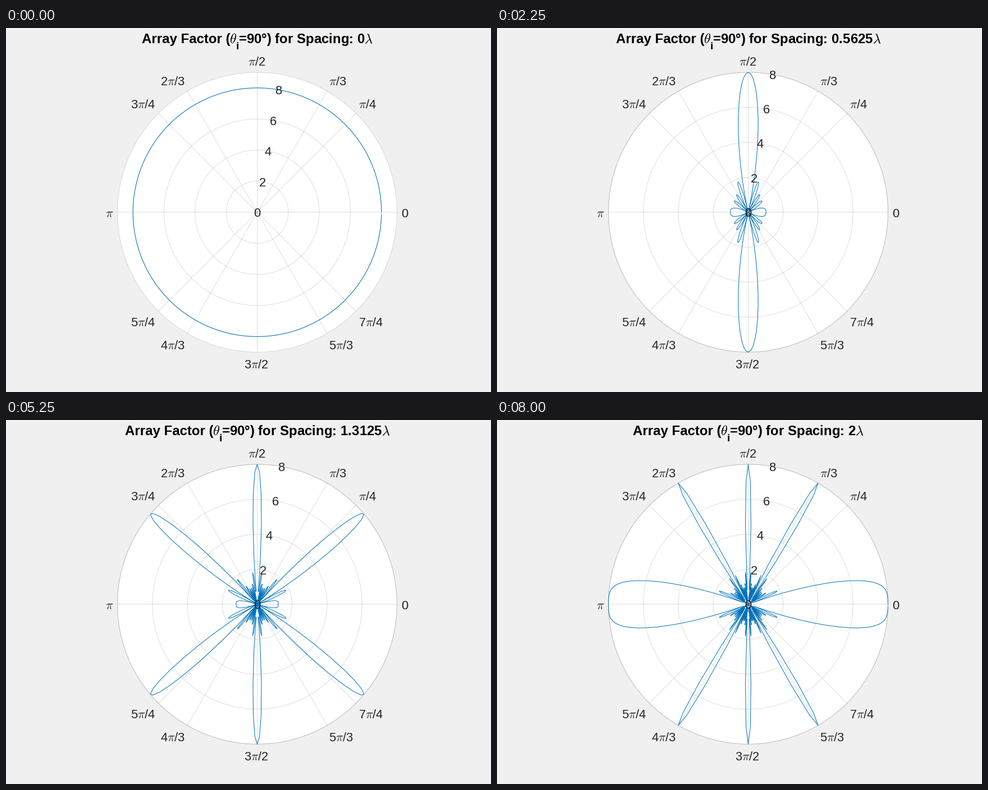
These frames come from a looping animation (864 by 648 pixels, 8.25 s). A matplotlib script:

```python
import numpy as np
import matplotlib.pyplot as plt
from matplotlib.animation import FuncAnimation
from matplotlib.patches import Circle

plt.rcParams.update({
    "font.family": "Liberation Sans",
    "mathtext.fontset": "cm",
    "path.snap": False,
})

W, H, DPI = 864, 648, 72
CX, CY, R = 447.5, 328, 249
ELEMENTS = 8
STEPS = 33
INK, BLUE = "#262626", "#0072BD"
TICK, TITLE = 22, 24

fig = plt.figure(figsize=(W / DPI, H / DPI), dpi=DPI, facecolor="#f0f0f0")
ax = fig.add_axes([0, 0, 1, 1])
ax.set_xlim(0, W)
ax.set_ylim(H, 0)
ax.axis("off")


def polar(angle, radius):
    return CX + radius * np.cos(angle), CY - radius * np.sin(angle)


def ring(radius):
    return ax.add_patch(Circle((CX, CY), radius, fill=False, ec=INK,
                               alpha=0.15, lw=1, zorder=2))


def label(x, y, text, size=TICK, **style):
    return ax.text(x, y, text, fontsize=size, va="baseline",
                   zorder=5, **{"color": INK, "ha": "center", **style})


# Plot area, spokes and rings
ax.add_patch(Circle((CX, CY), R, fc="white", ec="none", zorder=1))
ring(R)
rings = [ring(R * k / 8) for k in (2, 4, 6, 8)]
for deg in (0, 45, 60, 90, 120, 135, 180, 225, 240, 270, 300, 315):
    x, y = polar(np.radians(deg), R)
    ax.plot([CX, x], [CY, y], color=INK, alpha=0.15, lw=1, zorder=2)

# Angle labels
for x, y, text in [
    (710, 329, "0"), (644, 135, r"$\pi$/4"), (591, 94, r"$\pi$/3"),
    (447, 59, r"$\pi$/2"), (297, 94, r"2$\pi$/3"), (244, 135, r"3$\pi$/4"),
    (184, 329, r"$\pi$"), (244, 523, r"5$\pi$/4"), (297, 564, r"4$\pi$/3"),
    (446.5, 598, r"3$\pi$/2"), (597, 564, r"5$\pi$/3"), (650, 523, r"7$\pi$/4"),
]:
    label(x, y + 8, text)

radii = [label(CX, CY + 8, str(k)) for k in (0, 2, 4, 6, 8)]

# Title pieces: left edge for a one-digit value, and the text
bold = dict(color="black", ha="left", weight="bold")
head = label(242, 27, "Array Factor (", TITLE, **bold)
theta = label(398, 27, r"$\theta$", TITLE, **bold)
sub = label(410, 38, "i", 0.8 * TITLE, **bold)
tail = label(414.5, 27, "", TITLE, **bold)
pieces = [(t, t.get_position()[0]) for t in (head, theta, sub, tail)]

curve, = ax.plot([], [], color=BLUE, lw=1, zorder=4)
angles = np.radians(np.arange(360))


def array_factor(spacing):
    phase = 2 * np.pi * spacing * np.cos(angles)
    n = np.arange(ELEMENTS)[:, None]
    return np.abs(np.exp(1j * n * phase).sum(axis=0))


def update(i):
    spacing = i / 16
    scale = R / (9 if i == 0 else 8)
    curve.set_data(*polar(angles, scale * array_factor(spacing)))
    for k, circle in zip((2, 4, 6, 8), rings):
        circle.set_radius(scale * k)
    for k, text in zip((0, 2, 4, 6, 8), radii):
        x, y = polar(np.radians(80), scale * k)
        text.set_position((x, y + 8))

    value = f"{spacing:g}"
    tail.set_text(rf"=90°) for Spacing: {value}$\lambda$")
    digits = len(value.replace(".", ""))
    extra = TITLE * (0.556 * (digits - 1) + 0.278 * ("." in value))
    for text, x in pieces:
        text.set_x(x - extra / 2)
    return [curve, *rings, *radii, head, theta, sub, tail]


anim = FuncAnimation(fig, update, frames=STEPS, interval=250, repeat=True)
plt.show()
```
